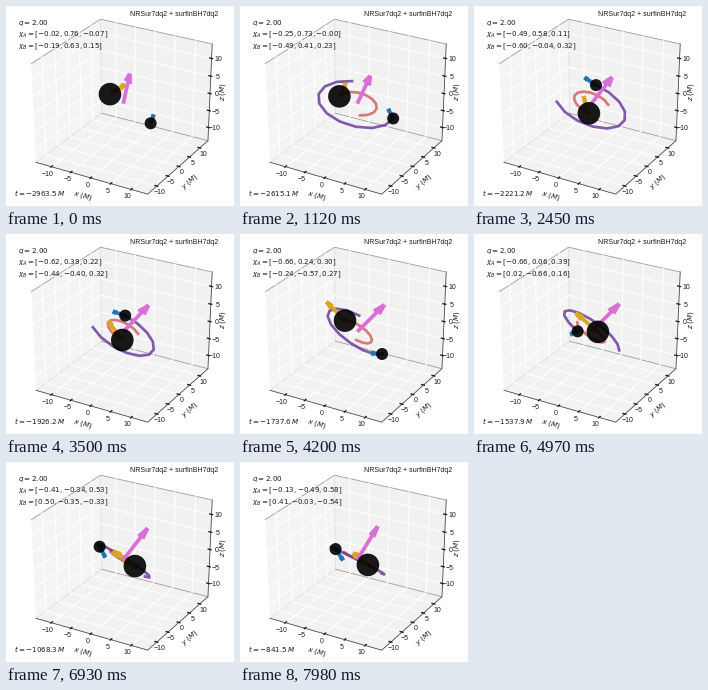
Animation of 228x200 px, one loop 8000 ms. Source, as a matplotlib script:

```python
import numpy as np
import matplotlib.pyplot as plt
from matplotlib.animation import FuncAnimation
from matplotlib.patches import Circle, Polygon

W, H, DPI = 228, 200, 64
PT = 72 / DPI                 # points per pixel
STEP, LAST, TICK = 70, 114, 20
SPAN = 28.0                   # axis range in M
TRAIL = 10                    # trail length in steps

fig = plt.figure(figsize=(W / DPI, H / DPI), dpi=DPI, facecolor="white")
ax = fig.add_axes([0, 0, 1, 1])
ax.set_xlim(0, W)
ax.set_ylim(H, 0)
ax.axis("off")

# camera at elevation 30, azimuth -60
e, a = np.radians(30), np.radians(-60)
EYE = np.array([np.cos(e) * np.cos(a), np.cos(e) * np.sin(a), np.sin(e)])
RIGHT = np.array([-np.sin(a), np.cos(a), 0])
UP = np.cross(EYE, RIGHT)


def project(p):
    p = np.asarray(p, float) / SPAN
    depth = 10 - p @ EYE
    return 117.3 + 1290 * (p @ RIGHT) / depth, 97.7 - 1128 * (p @ UP) / depth


def line(pts, color, width, z=1, **kw):
    x, y = project(pts)
    return ax.plot(x, y, color=color, lw=width * PT, zorder=z, **kw)[0]


def label(x, y, s, size, **kw):
    return ax.text(x, y, s, fontsize=size * PT, color="#1a1a1a", zorder=9, **kw)


# ---- box, grid and ticks ----
h = SPAN / 2
PANES = [
    ([(-h, -h, -h), (-h, h, -h), (-h, h, h), (-h, -h, h)], "0.957"),
    ([(-h, h, -h), (h, h, -h), (h, h, h), (-h, h, h)], "0.945"),
    ([(-h, -h, -h), (h, -h, -h), (h, h, -h), (-h, h, -h)], "0.95"),
]
for corners, shade in PANES:
    ax.add_patch(Polygon(np.column_stack(project(corners)), fc=shade, ec="none", zorder=0))

line([(-h, -h, -h), (-h, h, -h), (-h, h, h)], "0.86", 0.7)
line([(-h, -h, h), (-h, h, h), (h, h, h)], "0.6", 0.8)
line([(-h, h, -h), (h, h, -h)], "0.6", 0.8)
line([(-h, -h, -h), (h, -h, -h), (h, h, -h), (h, h, h)], "0.25", 0.8, 2)

CENTER = dict(ha="center", va="center", family="Liberation Sans")
t_in, t_out = SPAN * 0.2 / 12, SPAN * 0.1 / 12
for v in range(-10, 11, 5):
    line([(v, -h, -h), (v, h, -h), (v, h, h)], "white", 1.1)
    line([(h, v, -h), (-h, v, -h), (-h, v, h)], "white", 1.1)
    line([(h, h, v), (-h, h, v), (-h, -h, v)], "white", 1.1)
    line([(v, -h + t_in, -h), (v, -h - t_out, -h)], "0.1", 1.3, 2)
    line([(h - t_in, v, -h), (h + t_out, v, -h)], "0.1", 1.3, 2)
    line([(h - t_in, h, v), (h + t_out, h, v)], "0.1", 1.3, 2)
    s = str(v).replace("-", "\u2212")
    for p, dx, dy in (((v, -h, -h), -3.4, 7.5), ((h, v, -h), 3, 6.5), ((h, h, v), 6.5, 1.4)):
        x, y = project(p)
        label(x + dx, y + dy, s, 7.05, **CENTER)

plt.rcParams["mathtext.fontset"] = "dejavusans"
for x, y, name, turn in ((77, 189.7, "x", -16), (183.5, 176, "y", 42), (217.3, 86, "z", 90)):
    label(x, y, rf"$\mathit{{{name}}}\;(M)$", 7.1, rotation=turn, **CENTER)

label(212, 10.3, "NRSur7dq2 + surfinBH7dq2", 7.05, ha="right", family="Liberation Sans")
label(12, 18.7, r"$q=2.00$", 7.1)
spin_text = [label(12, 30.6, "", 7.1), label(12, 42.5, "", 7.1)]
time_text = label(8, 190, "", 7.1)

# ---- dynamics: smooth curves through a few known states ----
KNOTS = [0, 16, 35, 50, 71, 85, 114]


def smooth(values):
    return np.polynomial.Polynomial.fit(KNOTS, values, len(KNOTS) - 1)


clock = smooth([-2963.5, -2615.1, -2221.2, -1926.2, -1537.9, -1295.9, -841.5])
CHI_A = [smooth(c) for c in (
    [-.02, -.25, -.49, -.62, -.66, -.58, -.13],
    [.76, .73, .58, .39, .06, -.16, -.49],
    [-.07, -.002, .11, .22, .39, .48, .58])]
CHI_B = [smooth(c) for c in (
    [-.19, -.49, -.60, -.44, .02, .33, .41],
    [.63, .41, -.04, -.40, -.66, -.59, -.03],
    [.15, .23, .32, .32, .16, -.06, -.54])]
J = np.array([0.152, 0.36, 0.885])


def spin(chi, k):
    return np.stack([c(k) for c in chi], axis=-1)


def unit(v):
    return v / np.linalg.norm(v, axis=-1, keepdims=True)


def ang_mom(k):
    """Orbital direction from conservation of total angular momentum."""
    return unit(J - spin(CHI_A, k) * 4 / 9 - spin(CHI_B, k) / 9)


def separation(k):
    k = np.asarray(k, float)
    n = ang_mom(k)
    e2 = unit(np.cross(n, [1.0, 0, 0]))
    e1 = np.cross(e2, n)
    phi = np.radians(-18 + 24.4 * k)[..., None]
    r = 13.3 * ((167 - clock(k)) / 3130.5)[..., None] ** 0.25
    return r * (np.cos(phi) * e1 + np.sin(phi) * e2)


# ---- moving artists ----
def stroke(color, width, z, **kw):
    return ax.plot([], [], color=color, lw=width * PT, zorder=z, **kw)[0]


trail_a = stroke("indianred", 2.7, 3, alpha=0.8)
trail_b = stroke("rebeccapurple", 2.7, 3, alpha=0.8)


def make_arrow(color, width):
    style = dict(solid_capstyle="butt", solid_joinstyle="round")
    return [stroke(color, width, 4, **style) for _ in range(3)]


arrow_a = make_arrow("goldenrod", 3.8)
arrow_b = make_arrow("tab:blue", 3.8)
arrow_l = make_arrow("orchid", 3.8)
hole_a = ax.add_patch(Circle((0, 0), 11.3, fc="black", ec="none", alpha=0.9, zorder=6))
hole_b = ax.add_patch(Circle((0, 0), 6.0, fc="black", ec="none", alpha=0.9, zorder=6))


def set_arrow(parts, base, vec):
    tip = base + vec
    axis = unit(np.array([vec[1], -vec[0], 0.0]))
    side = np.cross(axis, vec)
    c, s = np.cos(np.radians(15)), np.sin(np.radians(15))
    parts[0].set_data(*project([base, tip]))
    for part, sign in zip(parts[1:], (1, -1)):
        part.set_data(*project([tip, tip - 0.3 * (c * vec + sign * s * side)]))


def update(i):
    k = min((i * TICK + TICK // 2) // STEP, LAST)
    path = separation(np.arange(max(0, k - TRAIL), k + 1))
    trail_a.set_data(*project(-path / 3))
    trail_b.set_data(*project(path * 2 / 3))

    pos_a, pos_b = -path[-1] / 3, path[-1] * 2 / 3
    chi_a, chi_b = spin(CHI_A, k), spin(CHI_B, k)
    set_arrow(arrow_a, pos_a, 9 * chi_a)
    set_arrow(arrow_b, pos_b, 4.7 * chi_b)
    set_arrow(arrow_l, np.zeros(3), 9.4 * ang_mom(k))

    hole_a.center = project(pos_a)
    hole_b.center = project(pos_b)
    hole_b.set_zorder(7 if pos_b @ EYE > pos_a @ EYE else 5)

    for text, name, chi in zip(spin_text, "AB", (chi_a, chi_b)):
        nums = ", ".join(f"{{{c:.2f}}}" for c in chi)
        text.set_text(rf"$\chi_{{{name}}}=[{nums}]$")
    time_text.set_text(rf"$t={{{clock(k):.1f}}}\,M$")
    return []


anim = FuncAnimation(fig, update, frames=400, interval=TICK, init_func=lambda: update(0),
                     repeat=True, repeat_delay=0, blit=False, cache_frame_data=False)
plt.show()
```
